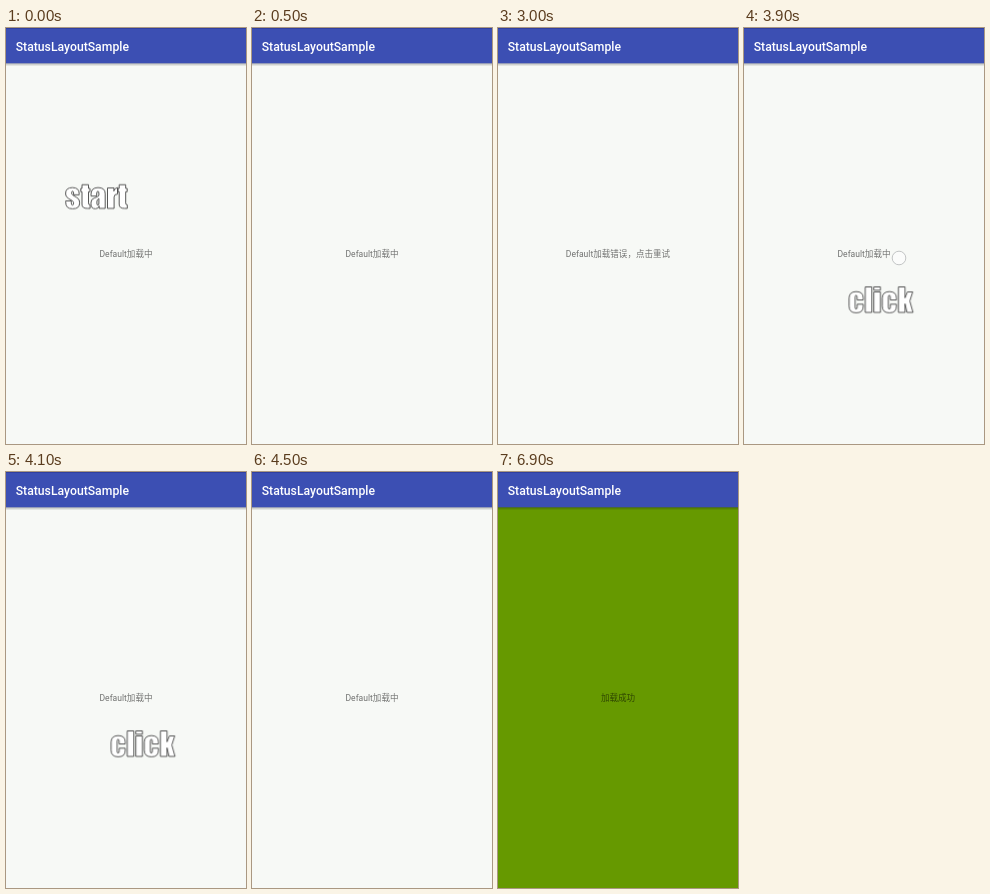
An HTML page for the animation above (8 s loop, 240 by 416 pixels).

```html
<!DOCTYPE html>
<html lang="zh-CN">
<head>
<meta charset="utf-8">
<title>StatusLayoutSample</title>
<style>
  html, body { margin: 0; width: 100%; height: 100%; overflow: hidden; background: #f7f9f6; }
  svg { display: block; width: 100vw; height: 100vh; }
  text { font-family: Roboto, "Noto Sans CJK SC", "Noto Sans CJK", sans-serif; }
  .title { font-size: 12.22px; font-weight: 500; fill: #fff; }
  .status { font-size: 8.556px; text-anchor: middle; fill: #000; fill-opacity: .54; }
  .word { fill: #fff; fill-rule: evenodd; stroke: #444; stroke-width: .9; stroke-linejoin: round; }
  .touch { fill: #fff; fill-opacity: .5; stroke: #b4b6b8; stroke-width: .8; }

  .word, .touch, .loading, .error, .success { opacity: 0; animation: 8s step-end infinite; }
  .start { animation-name: start; }
  .click { animation-name: click; }
  .touch { animation-name: touch; }
  .loading { animation-name: loading; }
  .error { animation-name: error; }
  .success { animation-name: success; }

  @keyframes start { 0% { opacity: 1 } 6.25%, 100% { opacity: 0 } }
  @keyframes click { 0% { opacity: 0 } 48.75% { opacity: 1 } 56.25%, 100% { opacity: 0 } }
  @keyframes touch { 0% { opacity: 0 } 48.75% { opacity: 1 } 50% { opacity: .5 } 51.25%, 100% { opacity: 0 } }
  @keyframes loading { 0% { opacity: 1 } 37.5% { opacity: 0 } 48.75% { opacity: 1 } 86.25%, 100% { opacity: 0 } }
  @keyframes error { 0% { opacity: 0 } 37.5% { opacity: 1 } 48.75%, 100% { opacity: 0 } }
  @keyframes success { 0% { opacity: 0 } 86.25%, 100% { opacity: 1 } }
</style>
</head>
<body>
<svg viewBox="0 0 240 416" preserveAspectRatio="none">
  <defs>
    <linearGradient id="shade" x2="0" y2="1">
      <stop stop-color="#000" stop-opacity=".28"/>
      <stop offset="1" stop-color="#000" stop-opacity="0"/>
    </linearGradient>
    <!-- condensed outline letters, baseline at y = 0 -->
    <path id="s" d="M14.2-13.6H8.6V-15Q8.6-17.2 7.7-17.2 6.6-17.2 6.6-15.6 6.6-14 7.8-13.3 12-10.9 13.3-9.7 14.6-8.4 14.6-5.4 14.6.4 7.6.4 .7.4 .7-6.2V-7.5H6.3V-5.5Q6.3-3.3 7.4-3.3 8.6-3.3 8.6-5.2 8.6-6.8 7.7-7.4 3-10 1.8-11.4 .6-12.8 .6-15 .6-20.8 7.4-20.8 14.2-20.8 14.2-14.8Z"/>
    <path id="t" d="M7.9-23.7V-20H9.4V-16.7H7.9V-5.2Q7.9-3.6 9.5-3.6V0H6.8Q1.4 0 1.4-4V-16.7H.2V-20H1.4V-23.7Z"/>
    <path id="a" d="M6.5-12.4H.8V-14Q.8-20.8 7.8-20.8 15-20.8 15-14.8V0H9V-2.4Q8 .4 5.2.4 .8.4 .8-4.6V-6Q.8-9.2 4-10.3 8.7-12 8.7-13V-15Q8.7-17.2 7.8-17.2 6.5-17.2 6.5-15ZM8.7-10Q6.7-8.8 6.7-7V-5Q6.7-3.2 7.7-3.2 8.7-3.2 8.7-5Z"/>
    <path id="r" d="M7.5-20.5L7.3-17.4Q8.5-20.7 11-20.8V-14.3Q7.6-14.3 7.6-11.5V0H1V-20.5Z"/>
    <path id="c" d="M15-12.5H8.9V-15.1Q8.9-17.2 7.9-17.2 6.9-17.2 6.9-15.3V-5.2Q6.9-3.3 7.9-3.3 9-3.3 9-5.7V-8.2H15V-6Q15 .4 8 .4 .9.4 .9-6.2V-14.2Q.9-20.8 8-20.8 15-20.8 15-14.5Z"/>
    <path id="l" d="M1 0V-25.5H7.6V0Z"/>
    <path id="i" d="M1-25.5H7.6V-22.2H1ZM1 0V-20.5H7.6V0Z"/>
    <path id="k" d="M1 0V-25.5H7.6V-14.6L10-20.5H15.3L12.4-11.4 15.6 0H9.6L7.6-8.6V0Z"/>
  </defs>

  <rect width="240" height="416" fill="#f7f9f6"/>
  <rect class="success" y="35" width="240" height="381" fill="#690"/>
  <rect y="35" width="240" height="3.5" fill="url(#shade)"/>
  <rect width="240" height="35.3" fill="#3c4fb3"/>
  <rect width="240" height="1" fill="#303f9f"/>
  <text class="title" x="9.7" y="23.1">StatusLayoutSample</text>

  <g class="loading"><text class="status" x="120" y="229">Default加载中</text></g>
  <g class="error"><text class="status" x="120" y="229">Default加载错误，点击重试</text></g>
  <g class="success"><text class="status" x="120" y="229">加载成功</text></g>

  <g class="word start" role="img" aria-label="start" transform="translate(59 180.4)">
    <use href="#s"/><use href="#t" x="15.6"/><use href="#a" x="25.2"/><use href="#r" x="41.5"/><use href="#t" x="52.8"/>
  </g>
  <circle class="touch" cx="155" cy="230" r="6.8"/>
  <g class="word click" role="img" aria-label="click" transform="translate(104.2 284.4)">
    <use href="#c"/><use href="#l" x="16"/><use href="#i" x="24.6"/><use href="#c" x="33.2"/><use href="#k" x="49.2"/>
  </g>
</svg>
</body>
</html>
```
